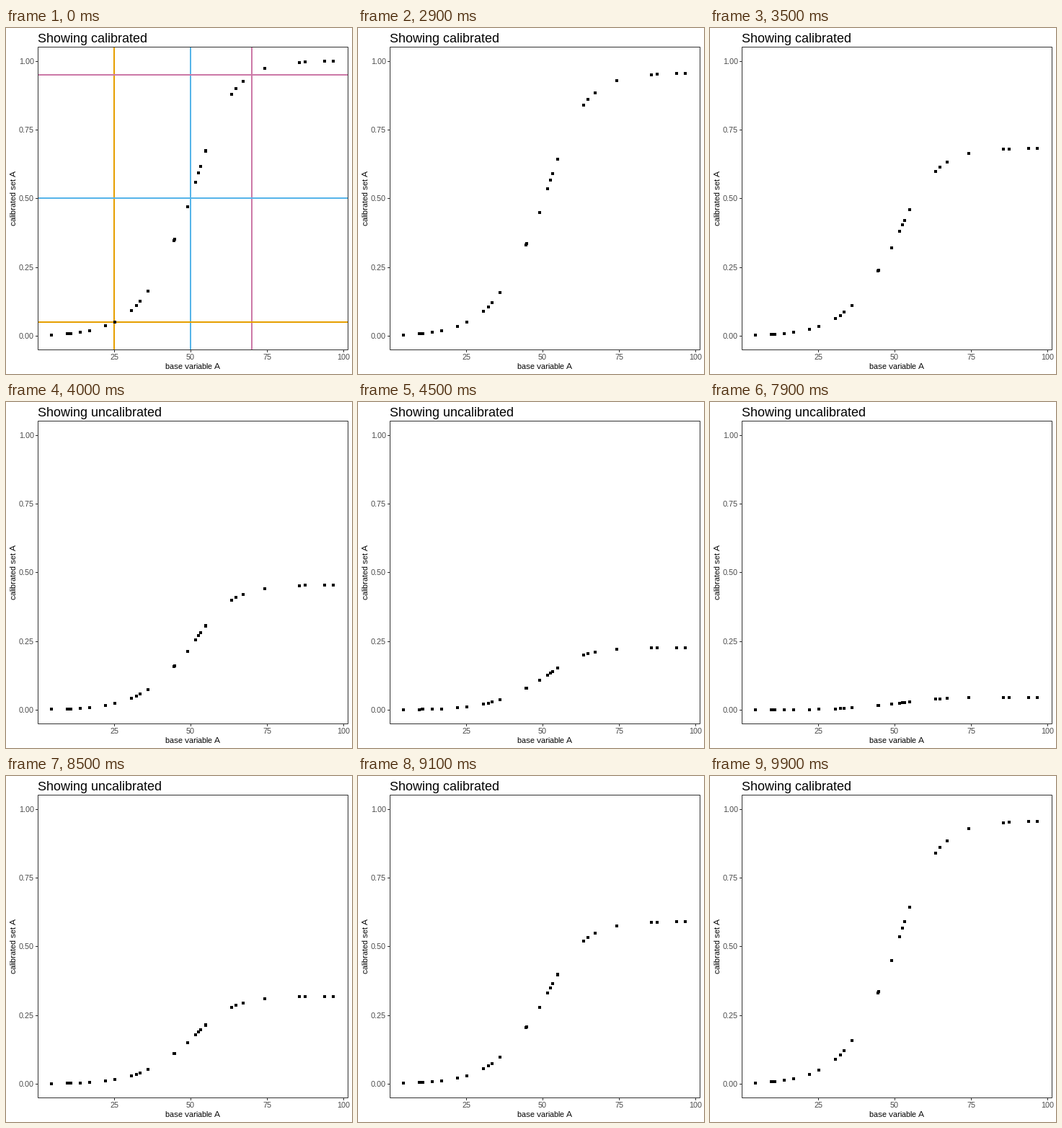
Write a matplotlib script that moves like this. It is 480 px wide and 480 px high and loops after 10000 ms.

```python
import numpy as np
import matplotlib.pyplot as plt
from matplotlib.animation import FuncAnimation
from matplotlib.collections import PolyCollection
from matplotlib.patches import Rectangle

# whole-pixel hinting keeps the small labels crisp
plt.rcParams.update({"text.hinting": "native", "text.hinting_factor": 1,
                     "font.family": "Liberation Sans"})

SIZE, DPI = 480, 96
PX = 72 / DPI  # points per pixel
LEFT, TOP, RIGHT, BOTTOM = 44, 26, 474, 446
FRAMES, HOLD, STEPS = 100, 28, 22
DARK, GREY = "#333333", "#4d4d4d"

# exclusion, crossover and inclusion thresholds
LOW, MID, HIGH = 25, 50, 70
COLORS = {LOW: "#e69f00", MID: "#56b4e9", HIGH: "#cc79a7"}

# the plotted observations
BASE = np.array([
    4.5, 9.7, 10.6, 10.9, 13.9, 17, 22.2, 25.3, 30.7, 32.3, 33.6, 36.19,
    44.6, 44.8, 49, 51.62, 52.55, 53.25, 54.89, 54.915, 63.45, 64.9, 67.2,
    74.25, 85.6, 87.5, 93.9, 96.7,
])


def calibrate(x):
    """Logistic membership: 0.05 at LOW, 0.5 at MID, 0.95 at HIGH."""
    width = np.where(x < MID, MID - LOW, HIGH - MID)
    return 1 / (1 + np.exp(-np.log(19) * (x - MID) / width))


def to_x(v):
    return np.rint(150 + 4.24 * (v - LOW))


def to_y(v):
    return np.rint(427.3 - 381.8 * v)


def level(i):
    """Share of the calibrated height reached in frame i."""
    half = FRAMES // 2
    moved = max(i % half - HOLD, 0) / STEPS
    return 1 - moved if i < half else moved


fig = plt.figure(figsize=(SIZE / DPI, SIZE / DPI), dpi=DPI, facecolor="white")
ax = fig.add_axes([0, 0, 1, 1])
ax.set(xlim=(0, SIZE), ylim=(SIZE, 0))
ax.axis("off")


def label(x, y, text, size=11, color="black", ha="center", angle=0):
    return ax.text(x, y, text, fontsize=size * PX, color=color, ha=ha,
                   va="baseline", rotation=angle, rotation_mode="anchor")


def segment(xs, ys, color=DARK, width=1, z=3):
    return ax.plot(xs, ys, color=color, lw=width * PX, zorder=z,
                   solid_capstyle="projecting")[0]


guides = []
for v, color in COLORS.items():
    x, y = to_x(v), to_y(calibrate(v))
    guides.append(segment([x, x], [TOP + 2, BOTTOM - 1], color, 2, 1))
    guides.append(segment([LEFT + 2, RIGHT - 1], [y, y], color, 2, 1.1))

ax.add_patch(Rectangle((LEFT, TOP), RIGHT - LEFT, BOTTOM - TOP, fill=False,
                       ec=DARK, lw=PX, zorder=3))

for k in range(5):
    x, y = to_x(25 * k), to_y(k / 4)
    segment([LEFT - 3, LEFT - 1], [y, y])
    label(LEFT - 5, y + 4, f"{k / 4:.2f}", color=GREY, ha="right")
    if k:
        segment([x, x], [BOTTOM + 1, BOTTOM + 3])
        label(x, 460, str(25 * k), color=GREY)

label(259, 473, "base variable A")
label(14, 235.5, "calibrated set A", angle=90)
title = label(LEFT, 20, "", 18, ha="left")

turn = np.linspace(0, 2 * np.pi, 24, endpoint=False)
DOT = 2 * np.column_stack([np.cos(turn), np.sin(turn)])
dots = PolyCollection([DOT], facecolor="black", edgecolor="none",
                      antialiased=False, zorder=2)
ax.add_collection(dots, autolim=False)


def draw(i):
    share = level(i)
    centers = np.column_stack([to_x(BASE), to_y(share * calibrate(BASE))])
    dots.set_verts(centers[:, None] + DOT)
    title.set_text("Showing " + ("uncalibrated" if 40 <= i < 90 else "calibrated"))
    for line in guides:
        line.set_visible(share == 1)
    return [dots, title, *guides]


anim = FuncAnimation(fig, draw, frames=FRAMES, interval=100, repeat=True,
                     repeat_delay=0)
plt.show()
```
